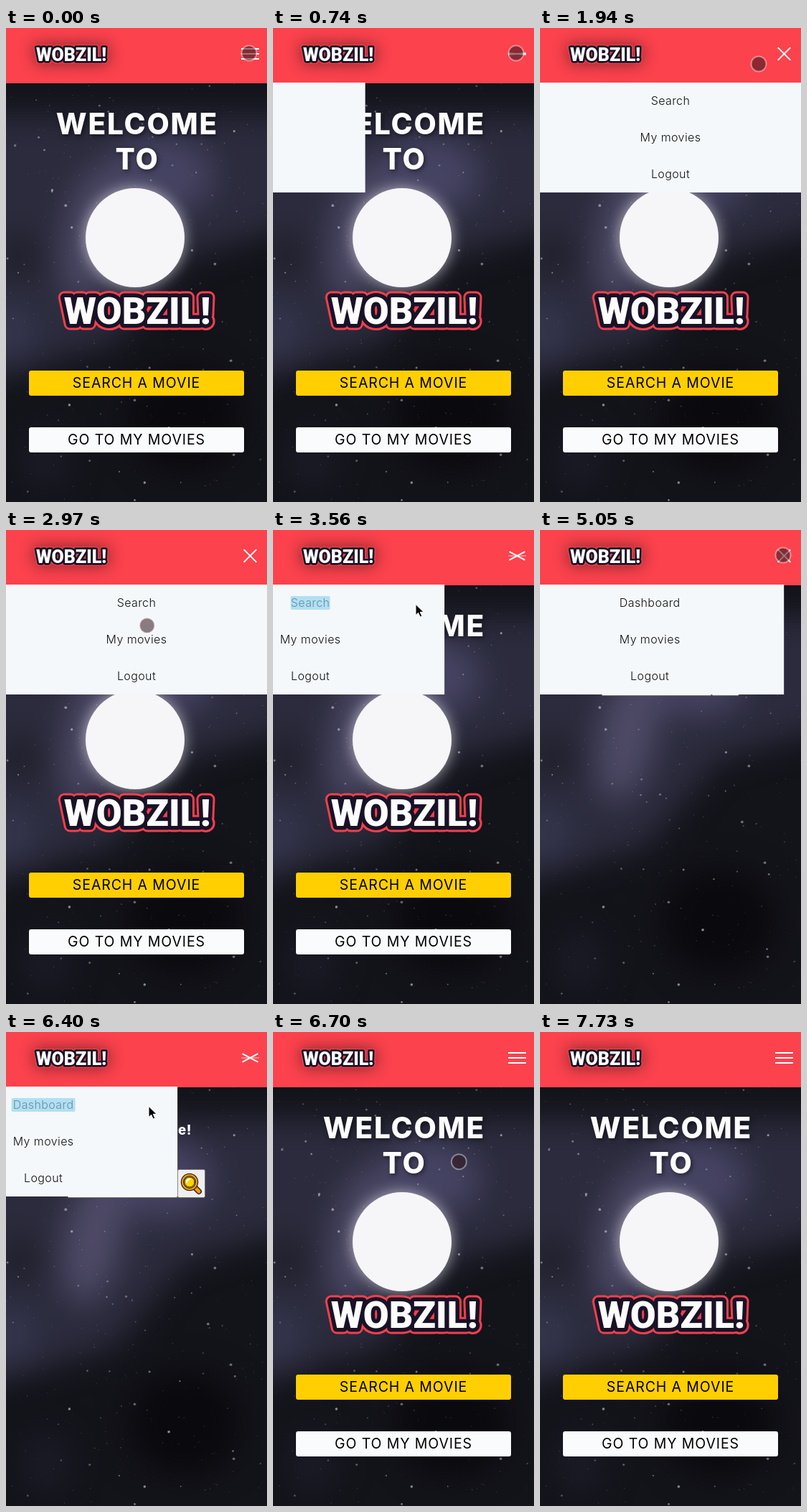
An HTML page that plays this animation: 364x660 px, repeating every 8330 ms.

```html
<!DOCTYPE html>
<html lang="en">
<head>
<meta charset="utf-8">
<title>Cinema app</title>
<style>
  html, body { margin: 0; height: 100%; overflow: hidden; background: #12121a; }
  svg { display: block; width: 100vw; height: 100vh; }
  text { font-family: Inter, "Open Sans", sans-serif; text-anchor: middle; }
  .welcome { font-size: 40.5px; font-weight: 800; letter-spacing: 1.8px; fill: #fcfcfc; filter: drop-shadow(2px 2px 3px #0008); }
  .btn { font-size: 19.5px; letter-spacing: .9px; }
  .item { font-size: 16px; font-weight: 300; letter-spacing: .4px; fill: #111; }
  .title { font-size: 18.7px; font-weight: 800; letter-spacing: .4px; fill: #fff; }
  .hint { font-size: 13.33px; letter-spacing: .2px; fill: #757575; text-anchor: start; }
  .word { font: 900 52px Roboto, sans-serif; fill: #fcfcfc; stroke-linejoin: round; paint-order: stroke; }
  .soft { filter: blur(22px); }
</style>
</head>
<body>
<svg viewBox="0 0 364 660" preserveAspectRatio="none">
  <defs>
    <g id="wordmark">
      <text class="word" y="19" stroke="#f2404d" stroke-width="17">WOBZIL!</text>
      <text class="word" y="19" stroke="#191226" stroke-width="11">WOBZIL!</text>
    </g>
    <clipPath id="field"><rect x="87" y="192" width="151" height="38"/></clipPath>
  </defs>

  <rect width="364" height="660" fill="#13131a"/>
  <g class="soft">
    <path d="M-60 120H424V270L250 320L150 440L-60 500Z" fill="#2b2b3d"/>
    <ellipse cx="215" cy="205" rx="75" ry="55" fill="#454362"/>
    <ellipse rx="40" ry="95" transform="translate(122 285) rotate(12)" fill="#4e4a67"/>
    <ellipse cx="5" cy="425" rx="40" ry="45" fill="#34344c"/>
    <ellipse cx="18" cy="318" rx="36" ry="34" fill="#20202c"/>
    <ellipse cx="250" cy="545" rx="80" ry="75" fill="#0a0a0e"/>
    <ellipse cx="55" cy="600" rx="35" ry="45" fill="#1b1b27"/>
  </g>
  <g id="stars" fill="#b4b4c2"></g>

  <g id="home">
    <text class="welcome" x="183" y="148">WELCOME</text>
    <text class="welcome" x="183" y="197">TO</text>
    <circle cx="180" cy="292" r="69" fill="#f6f5f8" style="filter:drop-shadow(0 0 10px #fff9)"/>
    <use href="#wordmark" transform="translate(183 393)"/>
    <rect x="32" y="477" width="300" height="35" rx="3" fill="#ffcf02"/>
    <text class="btn" x="182" y="501">SEARCH A MOVIE</text>
    <rect x="32" y="556" width="300" height="35" rx="3" fill="#fafbfc"/>
    <text class="btn" x="182" y="580">GO TO MY MOVIES</text>
  </g>

  <g id="search">
    <text class="title" x="182" y="143">Search a movie!</text>
    <rect x="86.5" y="191.5" width="152" height="39" fill="#fff" stroke="#767676"/>
    <text class="hint" x="88" y="216" clip-path="url(#field)">Type the title of a movie</text>
    <rect x="239.5" y="191.5" width="38" height="39" rx="2" fill="#efefef" stroke="#767676"/>
    <g fill="none" stroke-linecap="round">
      <path d="M264 217L269 222" stroke="#3a2410" stroke-width="8"/>
      <path d="M265 218L269 222" stroke="#f09a1e" stroke-width="5"/>
      <circle cx="256" cy="209" r="10" fill="#ffd500" stroke="#3a2410" stroke-width="4.5"/>
      <circle cx="256" cy="209" r="10" stroke="#f0a020" stroke-width="2"/>
      <circle cx="256" cy="209" r="7" stroke="#3a2410"/>
      <path d="M252 209A4 4 0 0 1 256 205" stroke="#fff" stroke-width="2.5"/>
    </g>
  </g>

  <rect width="364" height="77" fill="#fb424d"/>
  <use href="#wordmark" transform="translate(91 37) scale(.48)" style="filter:drop-shadow(0 0 22px #0007)"/>
  <g id="icon" stroke="#fff" stroke-width="2">
    <path d="M-12.5 0H12.5"/><path d="M-12.5 0H12.5"/><path d="M-12.5 0H12.5"/>
  </g>

  <g id="menu">
    <rect x="-5" y="76" width="374" height="153" fill="#f5f8fb"/>
    <text id="first" class="item" x="182" y="107"></text>
    <text class="item" x="182" y="158">My movies</text>
    <text class="item" x="182" y="209">Logout</text>
    <rect id="tap" y="92" height="19" rx="2" fill="#8fd3f0" opacity=".65"/>
  </g>

  <circle id="dot" r="10.5" fill="#32141c" fill-opacity=".55" stroke="#fff" stroke-opacity=".4" stroke-width="2"/>
  <path id="arrow" d="M0 0V15L3.6 11.8L6.2 17.6L8.8 16.4L6.2 10.8H11Z" stroke="#fff"/>
</svg>
<script>
const LOOP = 8330, TICKS = 56, STEP = LOOP / TICKS;
const el = id => document.getElementById(id);
const clamp = v => Math.max(0, Math.min(1, v));
const show = (node, on) => node.style.display = on ? "" : "none";

// Ticks at which the menu opens, its first item is tapped, and the page changes.
const visits = [
  { open: 5, tap: 23, leave: 26, item: "Search", width: 55 },
  { open: 33, tap: 43, leave: 44, item: "Dashboard", width: 89 }
];
const burger = { x: 339, y: 35 }, item = { x: 199, y: 106 };
const path = [
  { k: 12, ...burger }, { k: 13, x: 305, y: 50 }, { k: 17, x: 190, y: 214 },
  { k: 21, ...item }, { k: 25, ...item }, { k: 31, ...burger },
  { k: 34, ...burger }, { k: 38, ...item }, { k: 43, ...item },
  { k: 49, x: 380, y: 330 }, { k: 50, x: 380, y: 600 }, { k: 51, x: 349.5, y: 659.5 }, { k: 52, x: 350, y: 700 }
];

function pointer(k) {
  const i = path.findIndex(p => p.k >= k);
  if (i < 1) return path.at(i);
  const a = path[i - 1], b = path[i], f = (k - a.k) / (b.k - a.k);
  return { x: a.x + (b.x - a.x) * f, y: a.y + (b.y - a.y) * f };
}

function menuProgress(k, { open, tap, leave }) {
  if (k < open || k >= leave) return 0;
  if (k >= Math.max(tap, leave - 2)) return .648;
  return 1 - (1 - clamp((k - open) / 2 + .17)) ** 2.3;
}

let seed = 11;
const rand = () => (seed = seed * 16807 % 2147483647) / 2147483647;
for (let i = 0; i < 300; i++) {
  const c = document.createElementNS("http://www.w3.org/2000/svg", "circle");
  const size = rand() ** 6;
  const attrs = { cx: rand() * 364, cy: 77 + rand() * 583, r: .5 + size * 1.4, opacity: .2 + rand() * .3 + size * .3 };
  for (const name in attrs) c.setAttribute(name, attrs[name]);
  el("stars").append(c);
}

const bars = [...el("icon").children];
function drawIcon(p) {
  const gap = 7 * (1 - clamp(p / .3)), turn = 45 * clamp((p - .3) / .55);
  bars.forEach((bar, i) =>
    bar.setAttribute("transform", `translate(340.5 ${36 + (i - 1) * gap}) rotate(${(1 - i) * turn})`));
  bars[1].setAttribute("opacity", 1 - p);
}

function draw(t) {
  const k = Math.floor((t + 11.5) / STEP) % TICKS;
  const [first, second] = visits;
  const searching = k >= first.leave && k < second.leave;
  const visit = searching ? second : first;
  const tapped = k >= visit.tap && k < visit.leave;
  const open = menuProgress(k, visit);
  const { x, y } = pointer(k);

  show(el("home"), !searching);
  show(el("search"), searching);
  drawIcon(open);

  show(el("menu"), open > 0);
  el("menu").setAttribute("transform", `translate(${-369 * (1 - open)} 0)`);
  el("first").textContent = visit.item;
  el("tap").setAttribute("x", 182 - visit.width / 2);
  el("tap").setAttribute("width", visit.width);
  show(el("tap"), tapped);

  show(el("dot"), !tapped);
  show(el("arrow"), tapped);
  el("dot").setAttribute("transform", `translate(${x} ${y})`);
  el("arrow").setAttribute("transform", `translate(${x} ${y - 2.5})`);
}

function frame() {
  draw(performance.now() % LOOP);
  requestAnimationFrame(frame);
}
frame();
</script>
</body>
</html>
```
